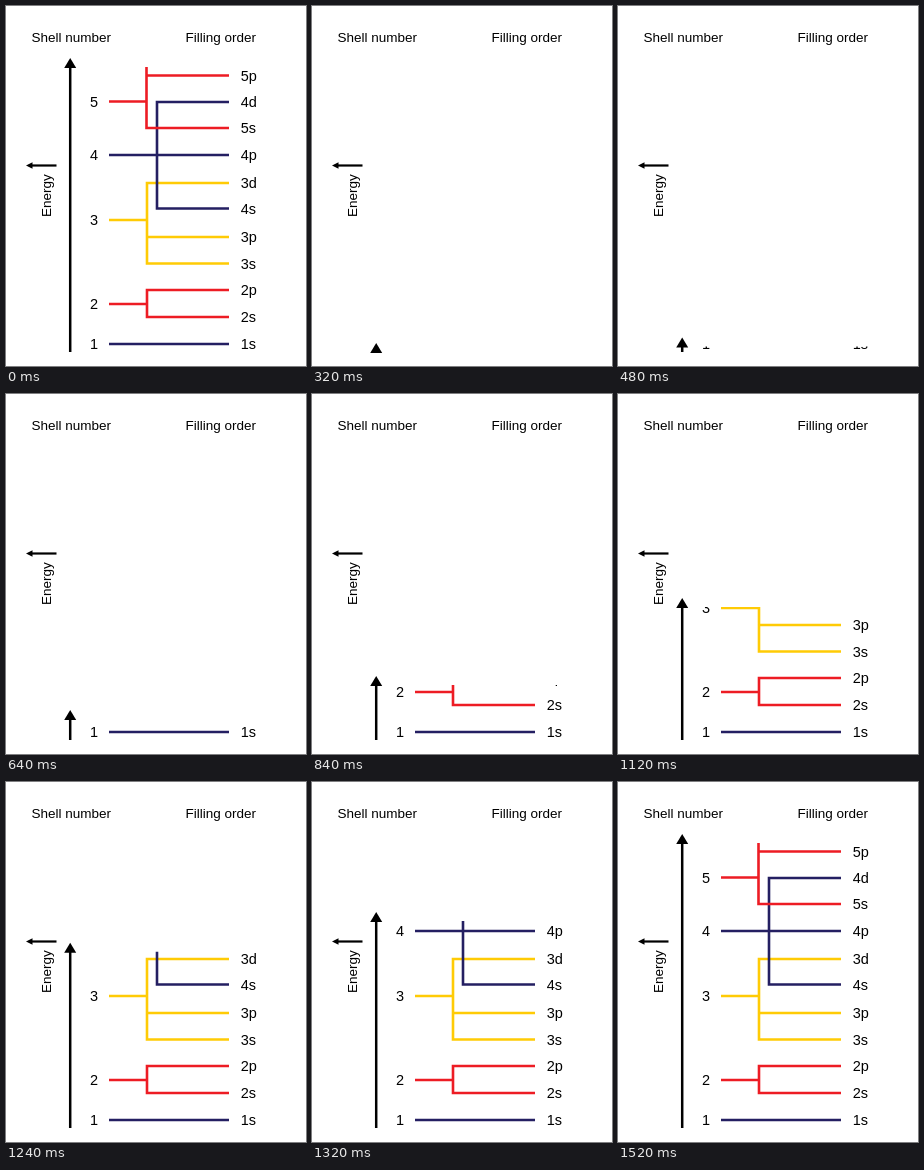
An HTML page for the animation above (4.2 s loop, 300 by 360 pixels).

```html
<!DOCTYPE html>
<html lang="en">
<head>
<meta charset="utf-8">
<title>Shell filling order</title>
<style>
  html, body { margin: 0; width: 100%; height: 100%; overflow: hidden; background: #fff; }
  svg { display: block; width: 300px; height: 360px; }
  text { font-family: "Liberation Sans", Arial, Helvetica, sans-serif; font-size: 13.5px; fill: #000; }
  .label text { font-size: 14.5px; }
  .label path { fill: none; stroke-width: 2.6; }
</style>
</head>
<body>
<svg viewBox="0 0 300 360">
  <defs><clipPath id="reveal"><rect id="window" x="0" y="61" width="300" height="299"/></clipPath></defs>
  <text x="25.4" y="35.6">Shell number</text>
  <text x="179.4" y="35.6">Filling order</text>
  <text transform="translate(45.2 211) rotate(-90)">Energy</text>
  <path d="M25 159.5H50.5" stroke="#000" stroke-width="2.2"/>
  <path d="M20 159.5L26.5 156.2V162.8Z"/>
  <g id="shells" class="label" clip-path="url(#reveal)"></g>
  <path id="shaft" stroke="#000" stroke-width="2.5"/>
  <path id="head" d="M64.2 0L70.2 10H58.2Z"/>
</svg>
<script>
const $ = id => document.getElementById(id);
const NAVY = '#241f62', RED = '#ed1c24', GOLD = '#ffcb05';

// shell, height, colour, branch x, sublevels [name, height]
const shells = [
  [1, 338, NAVY, 0, [['1s', 338]]],
  [2, 298, RED, 141, [['2s', 311], ['2p', 284]]],
  [3, 214, GOLD, 141, [['3s', 257.5], ['3p', 231], ['3d', 177]]],
  [4, 149, NAVY, 151, [['4s', 202.5], ['4p', 149], ['4d', 96]]],
  [5, 95.5, RED, 140.5, [['5s', 122], ['5p', 69.5]], 58]
];

const label = (x, y, s) => `<text x="${x}" y="${y + 5.2}">${s}</text>`;

$('shells').innerHTML = shells.map(([n, y, color, bx, subs, top]) => {
  const ys = subs.map(s => s[1]);
  let d = `M103 ${y}H${bx || 223}`;
  if (bx) {
    d += `M${bx} ${Math.max(...ys) + 1.3}V${top || Math.min(...ys) - 1.3}`;
    d += ys.map(v => `M${bx} ${v}H223`).join('');
  }
  return `<path d="${d}" stroke="${color}"/>` + label(84, y, n) +
    subs.map(([s, v]) => label(234.8, v, s)).join('');
}).join('');

// arrow tip: step, height, slope per step
const LOOP = 4200, START = 320, STEP = 40, LAST = 30;
const rise = [
  [0, 337, 0], [8, 316, -5.1], [13, 282, -8.6],
  [20, 204, -13.3], [25, 130, -15.3], [30, 52, -15.6]
];

function tipAt(step) {
  const i = rise.findIndex((k, j) => j && step <= k[0]);
  const [s0, y0, m0] = rise[i - 1], [s1, y1, m1] = rise[i];
  const h = s1 - s0, u = (step - s0) / h, v = 1 - u;
  return v * v * ((1 + 2 * u) * y0 + u * h * m0) +
         u * u * ((3 - 2 * u) * y1 - v * h * m1);
}

function draw(ms) {
  const t = ms % LOOP;
  const step = t < START ? LAST : Math.min(LAST, Math.floor((t - START) / STEP));
  const tip = tipAt(step), edge = tip + 9;
  $('window').setAttribute('y', edge);
  $('window').setAttribute('height', 360 - edge);
  $('head').setAttribute('transform', `translate(0 ${tip})`);
  $('shaft').setAttribute('d', `M64.2 ${tip + 8}V346`);
}

const begin = performance.now();
function frame() {
  draw(performance.now() - begin);
  requestAnimationFrame(frame);
}
frame();
</script>
</body>
</html>
```
